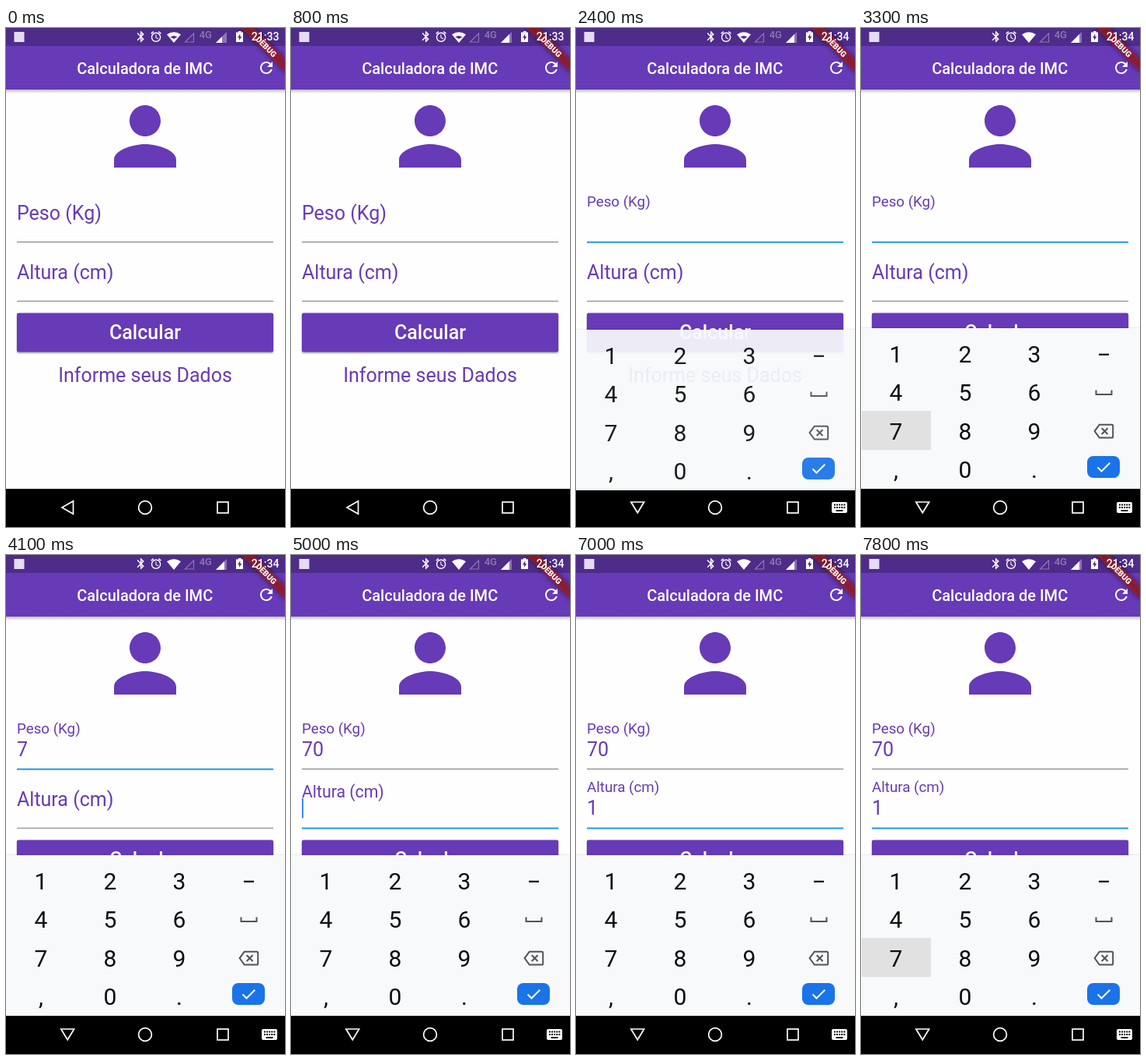
Recreate the animation shown at these times as an HTML page. Size 359 by 640 pixels, loop 8 s.

```html
<!DOCTYPE html>
<html lang="pt">
<head>
<meta charset="utf-8">
<title>Calculadora de IMC</title>
<style>
  html, body { margin: 0; width: 100%; height: 100%; overflow: hidden; background: #fff; }
  svg { display: block; width: 100vw; height: 100vh; font-family: Roboto, sans-serif; }
  .main { fill: #673ab7; }
  .big { font-size: 25px; }
  .mid { text-anchor: middle; }
  .med { font-weight: 500; }
  .nav { fill: none; stroke: #fff; stroke-width: 1.7; }
  #keys text { font-size: 30px; text-anchor: middle; fill: #0c0d0e; }
</style>
</head>
<body>
<svg viewBox="0 0 359 640" preserveAspectRatio="none">
  <defs>
    <linearGradient id="shade" x2="0" y2="1">
      <stop offset="0" stop-opacity=".24"/>
      <stop offset="1" stop-opacity="0"/>
    </linearGradient>
    <filter id="soft" x="-10%" y="-30%" width="120%" height="180%"><feGaussianBlur stdDeviation="1.3"/></filter>
    <filter id="blur" x="-20%" y="-100%" width="140%" height="300%"><feGaussianBlur stdDeviation="3"/></filter>
  </defs>
  <rect width="359" height="640" fill="#fefefe"/>

  <!-- app bar -->
  <rect y="79" width="359" height="5" fill="url(#shade)"/>
  <rect width="359" height="79" class="main"/>
  <rect width="359" height="23" fill="#4e2c8a"/>
  <text x="178.7" y="59" font-size="20" fill="#fff" class="mid med">Calculadora de IMC</text>
  <path transform="translate(323 39)" fill="#fff" d="M17.65 6.35C16.2 4.9 14.21 4 12 4c-4.42 0-7.99 3.58-7.99 8s3.57 8 7.99 8c3.73 0 6.84-2.55 7.73-6h-2.08c-.82 2.33-3.04 4-5.65 4-3.31 0-6-2.69-6-6s2.69-6 6-6c1.66 0 3.14.69 4.22 1.78L13 11h7V4z"/>

  <!-- corner ribbon -->
  <g transform="translate(359 0) rotate(45)">
    <rect x="-40" y="28" width="80" height="12" opacity=".5" filter="url(#blur)"/>
    <rect x="-40" y="28" width="80" height="12" fill="#b71c1c" fill-opacity=".63"/>
    <text y="37.7" font-size="10.2" font-weight="900" fill="#fff" class="mid">DEBUG</text>
  </g>

  <!-- status bar -->
  <g fill="#fff">
    <rect x="10.5" y="5" width="13" height="13" fill="#e4dcf2"/>
    <path transform="translate(165 2.5) scale(.72)" d="M17.71 7.71L12 2h-1v7.59L6.41 5 5 6.41 10.59 12 5 17.59 6.41 19 11 14.41V22h1l5.71-5.71-4.3-4.29zM13 5.83l1.88 1.88L13 9.59zm1.88 10.46L13 18.17v-3.76z"/>
    <path transform="translate(184.8 2.8) scale(.69)" d="M22 5.72l-4.6-3.86-1.29 1.53 4.6 3.86zM7.88 3.39L6.6 1.86 2 5.71l1.29 1.53zM12.5 8H11v6l4.75 2.85.75-1.23-4-2.37zM12 4c-4.97 0-9 4.03-9 9s4.02 9 9 9 9-4.03 9-9-4.03-9-9-9zm0 16c-3.87 0-7-3.13-7-7s3.13-7 7-7 7 3.13 7 7-3.13 7-7 7z"/>
    <path d="M207 8.3Q216 2 225 8.3L216 19z"/>
    <path id="notch" d="M211.5 11.5Q216 8.4 220.5 11.5L216 14z" fill="#4e2c8a"/>
    <path d="M230.5 18H241.5V7z" fill="none" stroke="#fff" stroke-opacity=".35" stroke-width="1.2"/>
    <text x="248.7" y="12.6" font-size="13" fill-opacity=".36" class="med">4G</text>
    <path d="M270 19H284V5z" fill-opacity=".35"/>
    <path id="signal"/>
    <path d="M299 4h3.5v1.4h2.5V18h-9V5.4h3z"/>
    <path d="M301.3 7.5L298 12.4h2v3.6l3.3-5h-2z" fill="#4e2c8a"/>
    <text id="clock" x="315.8" y="16.3" font-size="14" class="med"></text>
  </g>

  <!-- form -->
  <path class="main" transform="translate(119 79) scale(5)" d="M12 12c2.21 0 4-1.79 4-4s-1.79-4-4-4-4 1.79-4 4 1.79 4 4 4zm0 2c-2.67 0-8 1.34-8 4v2h16v-2c0-2.66-5.33-4-8-4z"/>
  <g id="form"></g>
  <rect x="14" y="367" width="330" height="50" rx="2" opacity=".38" filter="url(#soft)"/>
  <rect x="14" y="365.5" width="330" height="50" rx="2" class="main"/>
  <text x="179" y="399" fill="#fff" class="big mid med">Calcular</text>
  <text x="179" y="453.8" class="main big mid">Informe seus Dados</text>

  <!-- navigation bar -->
  <rect y="591" width="359" height="49"/>
  <path id="back" class="nav"/>
  <circle cx="179" cy="615" r="8.4" class="nav"/>
  <rect x="272" y="608" width="14" height="14" class="nav"/>
  <g id="kbIcon">
    <rect x="329" y="608" width="20" height="14" rx="2" fill="#fff"/>
    <path d="M332 611.5h15M332 615h15" stroke="#000" stroke-width="1.9" stroke-dasharray="1.9 1.2"/>
    <path d="M334.5 619h9" stroke="#000" stroke-width="1.8"/>
  </g>

  <!-- keyboard -->
  <g id="pad">
    <rect y="383.5" width="359" height="2" opacity=".06"/>
    <rect y="385" width="359" height="206" fill="#f7f9fb"/>
    <rect id="press" width="89" height="50" fill="#e1e1e1"/>
    <g id="keys"></g>
    <path d="M306 418.8H319" stroke="#0c0d0e" stroke-width="2.2"/>
    <g fill="none" stroke="#505357" stroke-width="2">
      <path d="M302.5 464.5V470H322.5V464.5"/>
      <path d="M306.8 508.7H322.6Q324.2 508.7 324.2 510.3V523.9Q324.2 525.5 322.6 525.5H306.8L300.6 517.1z"/>
      <path d="M309.7 513.2l7.8 7.8M317.5 513.2l-7.8 7.8"/>
    </g>
    <rect x="291" y="549" width="42" height="28" rx="8" fill="#1a73e8"/>
    <path d="M304.5 563.5l5 5L320.3 557.7" fill="none" stroke="#fff" stroke-width="2"/>
  </g>
</svg>
<script>
const LOOP = 8000, STEP = 100;
const $ = id => document.getElementById(id);
const clamp = v => Math.max(0, Math.min(1, v));
const ease = p => p * p * (3 - 2 * p);
const within = (t, spans) => spans.some(([a, b]) => t >= a && t < b);
const show = (el, on) => el.setAttribute('visibility', on ? 'visible' : 'hidden');
const set = (el, attrs) => { for (const k in attrs) el.setAttribute(k, attrs[k]); };

function add(parent, tag, attrs, text = '') {
  const el = document.createElementNS('http://www.w3.org/2000/svg', tag);
  set(el, attrs);
  el.textContent = text;
  return parent.appendChild(el);
}

const CELL = 89, ROW = 49.6;
['123', '456', '789', ',0.'].forEach((row, r) => [...row].forEach((ch, c) =>
  add($('keys'), 'text', { x: 45 + c * CELL, y: 428.6 + r * ROW }, ch)));

function field(y, label) {
  const form = $('form');
  return {
    y,
    label: add(form, 'text', { class: 'main big' }, label),
    value: add(form, 'text', { class: 'main big', x: 14, y: y + 57.5 }),
    line: add(form, 'rect', { x: 14, width: 330 }),
    caret: add(form, 'rect', { width: 2, fill: '#4285f4' })
  };
}
const weight = field(200, 'Peso (Kg)'), height = field(275.8, 'Altura (cm)');

// Key presses: start, column, row; each lasts 100 ms
const PRESSES = [[3300, 0, 2], [4000, 1, 3], [6100, 0, 0], [7800, 0, 2, 200]];
const WEIGHT_CARET = [[2000, 2300], [2700, 3300], [3500, 3900], [4200, 4600]];
const HEIGHT_CARET = [[4900, 5300], [5800, 6700], [7200, 7600]];

function drawField(f, float, focused, text, caretOn) {
  const size = 1 - 0.25 * float;
  set(f.label, { transform: `translate(14 ${f.y + 46 - 17.5 * float}) scale(${size})` });
  f.value.textContent = text;
  set(f.line, {
    y: f.y + (focused ? 73.7 : 74),
    height: focused ? 2 : 1,
    fill: focused ? '#2196f3' : '#777'
  });
  set(f.caret, {
    x: 14 + 14 * text.length,
    y: f.y + (text ? 33.2 : 36),
    height: text ? 30 : 25.5
  });
  show(f.caret, caretOn);
}

function draw(t) {
  const open = t >= 2000, second = t >= 4900;

  $('clock').textContent = t < 1600 ? '21:33' : '21:34';
  show($('notch'), t < 2500);
  const edge = t < 800 ? 278 : 281;
  set($('signal'), { d: `M270 19H${edge}V${289 - edge}z` });

  drawField(weight, open ? 1 : 0, open && !second,
    t < 3500 ? '' : t < 4200 ? '7' : '70', within(t, WEIGHT_CARET));
  drawField(height, ease(clamp((t - 4870) / 230)), second,
    t < 6300 ? '' : '1', within(t, HEIGHT_CARET));

  set($('back'), { d: open ? 'M70.8 608H87.6L79.2 621.8z' : 'M72 615L86.5 606.8V623.2z' });
  show($('kbIcon'), open);

  // The keyboard decelerates upwards while fading in
  const rest = 1 - clamp((t - 2250) / 350);
  set($('pad'), {
    transform: `translate(0 ${125 * rest ** 7.4})`,
    opacity: t < 2300 ? 0 : 1 - rest ** 4.7
  });

  const hit = PRESSES.find(([a, , , d = 100]) => t >= a && t < a + d);
  show($('press'), hit);
  if (hit) set($('press'), { x: 1 + hit[1] * CELL, y: 392 + hit[2] * ROW });
}

const start = performance.now();
function tick() {
  const t = (performance.now() - start) % LOOP;
  draw(Math.floor(t / STEP) * STEP);
  requestAnimationFrame(tick);
}
draw(0);
requestAnimationFrame(tick);
</script>
</body>
</html>
```
